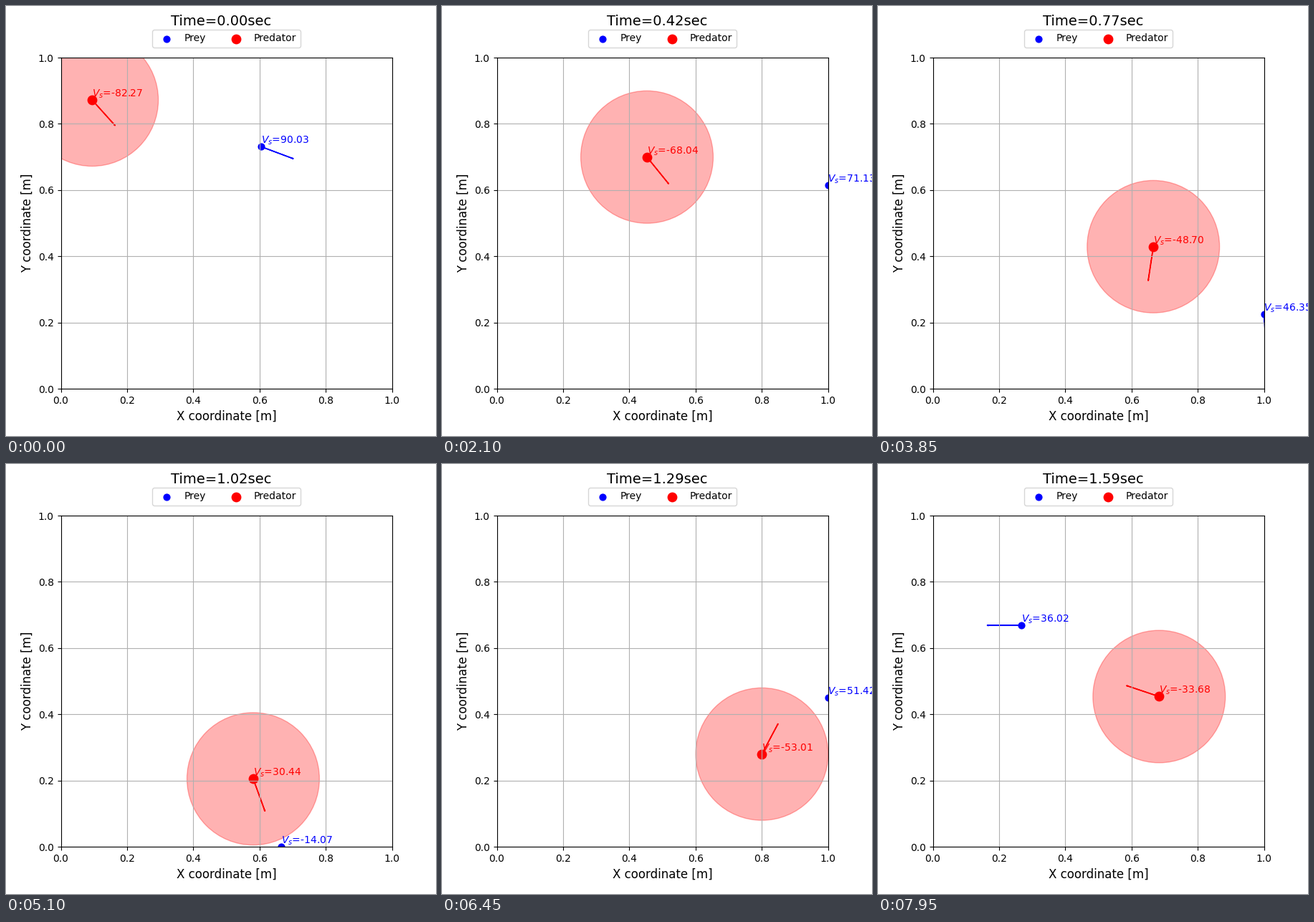
Recreate the animation shown at these times as a matplotlib script. Size 600 by 600 pixels, loop 8 s.

```python
import numpy as np
import matplotlib.pyplot as plt
from matplotlib.animation import FuncAnimation

FRAMES = 160
INTERVAL = 50
DT = 0.01

# Key moments; each agent gives x, y, heading (degrees) and value there.
# A point beyond the unit square means the agent is pressed to the wall.
KEY_STEPS = np.array([0, 16, 42, 77, 102, 129, 159])
PREY_KEYS = [
    (.605, .731, -20.5, 90.03), (1.03, .6645, -5, 75.62),
    (1, .6147, -4, 71.13), (1, .225, -86, 46.35), (.666, 0, -92, -14.07),
    (1.05, .45, 70, 51.42), (.268, .6685, 180, 36.02)]
PREDATOR_KEYS = [
    (.0945, .872, -48, -82.27), (.237, .814, -3, -76.84),
    (.4535, .6996, -51, -68.04), (.666, .429, -98.6, -48.70),
    (.581, .205, -70, 30.44), (.8006, .2797, 62, -53.01),
    (.6835, .4535, 161.5, -33.68)]


def unit(angle):
    return np.column_stack([np.cos(angle), np.sin(angle)])


def track(pos, heading, speed):
    """Hermite path that leaves each key point along its heading."""
    vel = speed * unit(heading)
    vel[((pos >= 1) & (vel > 0)) | ((pos <= 0) & (vel < 0))] = 0

    steps = np.arange(FRAMES)
    k = np.clip(np.searchsorted(KEY_STEPS, steps, side="right") - 1,
                0, len(KEY_STEPS) - 2)
    span = np.diff(KEY_STEPS)[k][:, None]
    s = (steps - KEY_STEPS[k])[:, None] / span
    xy = ((1 + 2 * s) * (1 - s) ** 2 * pos[k]
          + s * (1 - s) ** 2 * span * vel[k]
          + s ** 2 * (3 - 2 * s) * pos[k + 1]
          + s ** 2 * (s - 1) * span * vel[k + 1])
    return np.clip(xy, 0, 1)


class Agent:
    def __init__(self, ax, keys, speed, color, size, label):
        keys = np.array(keys)
        heading = np.radians(keys[:, 2])
        steps = np.arange(FRAMES)
        self.xy = track(keys[:, :2], heading, speed)
        self.dir = 0.1 * unit(np.interp(steps, KEY_STEPS, heading))
        self.values = np.interp(steps, KEY_STEPS, keys[:, 3])
        self.dot = ax.scatter(*self.xy[0], s=size, c=color, label=label)
        self.arrow = ax.arrow(0, 0, 0.1, 0, color=color)
        self.text = ax.text(0, 0, "", color=color)

    def show(self, i):
        x, y = self.xy[i]
        dx, dy = self.dir[i]
        self.dot.set_offsets([(x, y)])
        self.arrow.set_data(x=x, y=y, dx=dx, dy=dy)
        self.text.set_position((x, y + 0.01))
        self.text.set_text(f"$V_s$={self.values[i]:.2f}")


fig, ax = plt.subplots(figsize=(6, 6), dpi=100)
ax.set_aspect("equal")
ax.set_xlabel("X coordinate [m]", fontsize=12)
ax.set_ylabel("Y coordinate [m]", fontsize=12)
ax.grid(True)
title = fig.suptitle("Time=0.00sec", fontsize=14)

prey = Agent(ax, PREY_KEYS, 0.03, "blue", 40, "Prey")
predator = Agent(ax, PREDATOR_KEYS, 0.01, "red", 80, "Predator")
zone = plt.Circle((0, 0), 0.2, color="red", alpha=0.3)
ax.add_patch(zone)
ax.set_xlim(0, 1)
ax.set_ylim(0, 1)
ax.legend(loc="upper center", bbox_to_anchor=(0.5, 1.1), ncol=2)


def update(i):
    title.set_text(f"Time={i * DT:.2f}sec")
    prey.show(i)
    predator.show(i)
    zone.center = tuple(predator.xy[i])
    return []


anim = FuncAnimation(fig, update, frames=FRAMES, interval=INTERVAL,
                     init_func=lambda: update(0), repeat=True, repeat_delay=0)
plt.show()
```
